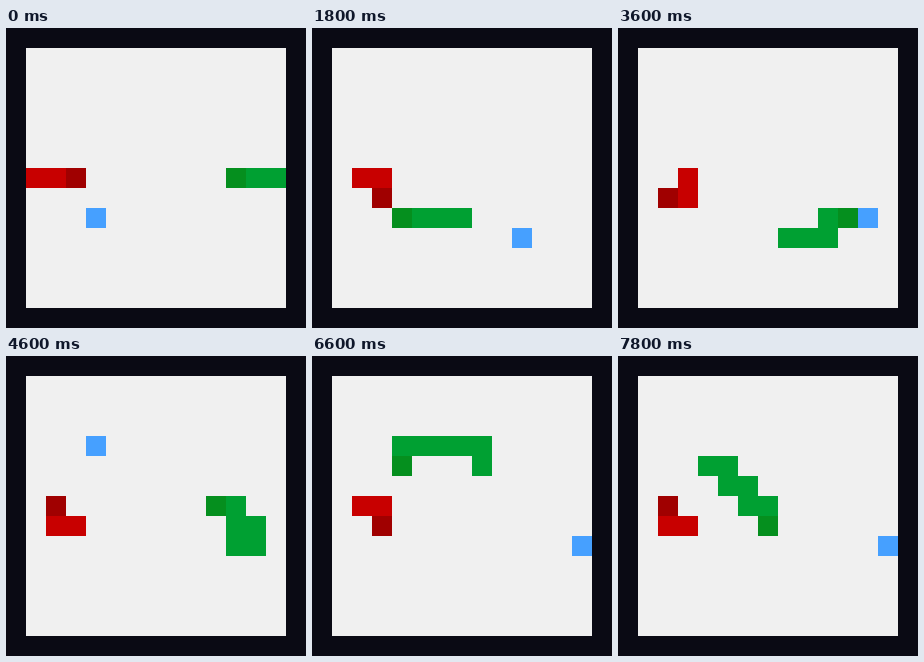
Animation, 300 px wide and 300 px high, one loop 8000 ms. Source, as an HTML page with a canvas:

```html
<!DOCTYPE html>
<html lang="en">
<head>
<meta charset="utf-8">
<title>Two snakes</title>
<style>
html, body { margin: 0; width: 100%; height: 100%; overflow: hidden; background: #0a0a14; }
canvas { display: block; }
</style>
</head>
<body>
<canvas id="stage" width="300" height="300"></canvas>
<script>
const ctx = document.getElementById('stage').getContext('2d');
const CELL = 20, STEP = 200, STEPS = 40;
const FOODS = [[4, 9], [10, 10], [12, 9], [4, 4], [13, 9]];
const CIRCLE = [[3, 7], [3, 8], [2, 8], [2, 7]];
const RED = { head: '#a00000', body: '#c80000' };
const GREEN = { head: '#058f1e', body: '#00a032' };

// The green snake turns whenever the food is off its other axis.
function chase() {
  let snake = [[11, 7], [12, 7], [13, 7]];
  let axis = 0, eaten = 0;
  const states = [{ snake, food: FOODS[0] }];
  while (states.length < STEPS) {
    const food = FOODS[eaten];
    const head = snake[0].slice();
    if (food[1 - axis] !== head[1 - axis]) axis = 1 - axis;
    head[axis] += Math.sign(food[axis] - head[axis]);
    const ate = head[0] === food[0] && head[1] === food[1];
    if (ate) eaten++;
    snake = [head, ...(ate ? snake : snake.slice(0, -1))];
    states.push({ snake, food: FOODS[eaten] });
  }
  return states;
}

// The red snake enters from the left, then circles four cells.
function circling(n) {
  return [n, n - 1, n - 2].map(i => i < 0 ? [3 + i, 7] : CIRCLE[i % 4]);
}

function cell([x, y], color) {
  ctx.fillStyle = color;
  ctx.fillRect(x * CELL, y * CELL, CELL, CELL);
}

function drawSnake(snake, colors) {
  snake.slice(1).forEach(p => cell(p, colors.body));
  cell(snake[0], colors.head);
}

const states = chase();

function draw(n) {
  ctx.fillStyle = '#0a0a14';
  ctx.fillRect(0, 0, 300, 300);
  ctx.fillStyle = '#f0f0f0';
  ctx.fillRect(CELL, CELL, 260, 260);
  cell(states[n].food, '#46a0ff');
  drawSnake(circling(n), RED);
  drawSnake(states[n].snake, GREEN);
}

const start = performance.now();
function tick() {
  const t = performance.now() - start;
  draw(Math.floor(t / STEP) % STEPS);
  requestAnimationFrame(tick);
}
tick();
</script>
</body>
</html>
```
